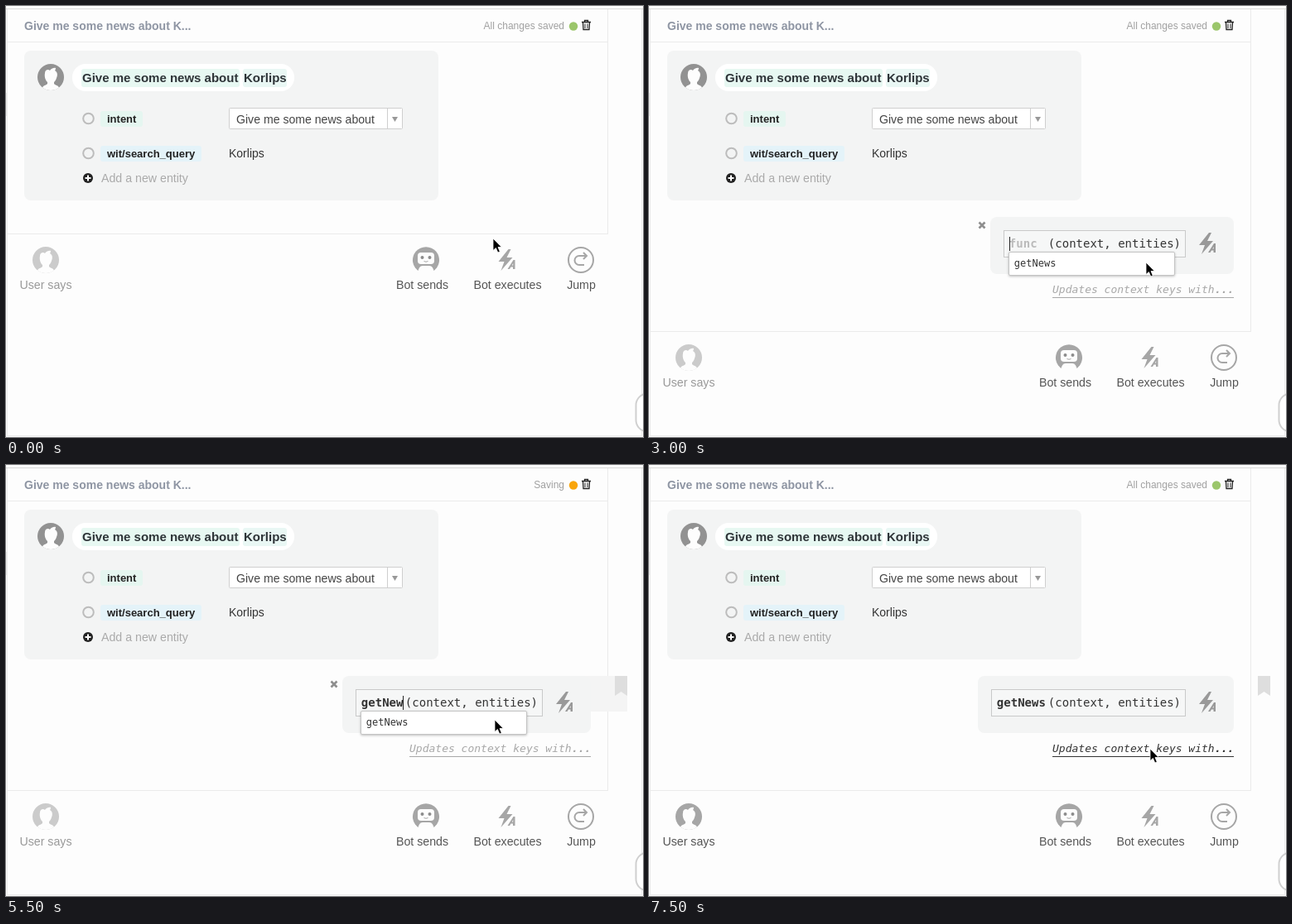
An HTML page that plays this animation: 769x521 px, repeating every 8000 ms.

```html
<!DOCTYPE html>
<html lang="en">
<head>
<meta charset="utf-8">
<title>Story editor</title>
<style>
html, body { margin: 0; width: 100%; height: 100%; overflow: hidden; background: #fdfdfd; }
#stage { position: relative; width: 769px; height: 521px; overflow: hidden; background: #fdfdfd;
  font: 14px "Liberation Sans", Arial, sans-serif; }
svg { display: block; }
.layer { position: absolute; left: 0; top: 0; }
.b { font-weight: bold; }
.rule { fill: #ebebeb; }
.mono { font-family: "DejaVu Sans Mono", monospace; }
.label { font-size: 14.2px; fill: #555; text-anchor: middle; }

/* every change is a hard step on one shared clock */
.t { animation: 8s step-end infinite; }
#foot { animation-name: foot; }
#sideLow { animation-name: open; }
#cursor { animation-name: cursor; }
#hover { animation-name: hover; }
#execIcon { animation-name: execIcon; }
#execLabel { animation-name: execLabel; }
#userIcon { animation-name: userIcon; }
#userLabel { animation-name: userLabel; }
#saved { animation-name: saved; }
#saving { animation-name: saving; }
#dot { animation-name: dot; }
#mark { animation-name: mark; }
#tintRight { animation-name: tintRight; }
#tintLeft { animation-name: tintLeft; }
#panel { animation-name: open; }
#close { animation-name: close; }
#input { animation-name: grow; }
#typed { animation-name: type; }
#hint { animation-name: hint; }
#popup { animation-name: popup; }
#keys { animation-name: open, keys; }

@keyframes foot { 0% { transform: none } 37.5%, 100% { transform: translateY(118px) } }
@keyframes open { 0% { opacity: 0 } 37.5%, 100% { opacity: 1 } }
@keyframes close { 0% { opacity: 1 } 90.625%, 100% { opacity: 0 } }
@keyframes hover { 0% { opacity: 0 } 21.875% { opacity: 1 } 37.5%, 100% { opacity: 0 } }
@keyframes execIcon { 0% { color: #a6a6a6 } 21.875% { color: #8c8c8c } 37.5%, 100% { color: #a6a6a6 } }
@keyframes execLabel { 0% { fill: #555 } 21.875% { fill: #222 } 37.5%, 100% { fill: #555 } }
@keyframes userIcon { 0% { color: #cbcbcb } 90.625%, 100% { color: #a6a6a6 } }
@keyframes userLabel { 0% { fill: #999 } 90.625%, 100% { fill: #555 } }
@keyframes saved { 0% { opacity: 1 } 56.25% { opacity: 0 } 78.125%, 100% { opacity: 1 } }
@keyframes saving { 0% { opacity: 0 } 56.25% { opacity: 1 } 78.125%, 100% { opacity: 0 } }
@keyframes dot { 0% { fill: #9bc66b } 50% { fill: #f9a50b } 84.375%, 100% { fill: #9bc66b } }
@keyframes mark { 0% { opacity: 0 } 50%, 100% { opacity: 1 } }
@keyframes tintRight { 0% { opacity: 0 } 50% { opacity: 1 } 93.75%, 100% { opacity: 0 } }
@keyframes tintLeft { 0% { opacity: 0 } 71.875% { opacity: 1 } 93.75%, 100% { opacity: 0 } }
@keyframes hint { 0% { opacity: 1 } 50%, 100% { opacity: 0 } }
@keyframes popup { 0% { opacity: 1 } 71.875%, 100% { opacity: 0 } }
@keyframes grow { 0% { width: 47px } 68.75% { width: 53px } 71.875%, 100% { width: 62px } }
@keyframes type {
  0% { width: 0; border-color: #222 }
  50% { width: 1ch }
  59.375% { width: 2ch }
  62.5% { width: 3ch }
  65.625% { width: 4ch }
  68.75% { width: 6ch; border-color: #222 }
  71.875%, 100% { width: 7ch; border-color: transparent }
}
@keyframes keys {
  0% { color: #a8a8a8; border-color: #a8a8a8 }
  90.625%, 100% { color: #333; border-color: #333 }
}
@keyframes cursor {
  0% { transform: translate(588px, 281px) }
  3.125% { transform: translate(566px, 297px) }
  6.25% { transform: translate(527px, 313px) }
  9.375% { transform: translate(501px, 309px) }
  12.5% { transform: translate(511px, 305px) }
  18.75% { transform: translate(523px, 297px) }
  21.875% { transform: translate(555px, 299px) }
  25% { transform: translate(583px, 306px) }
  28.125% { transform: translate(598px, 313px) }
  31.25% { transform: translate(600px, 311px) }
  37.5% { transform: translate(600px, 310px) }
  43.75% { transform: translate(595px, 309px) }
  46.875% { transform: translate(590px, 308px) }
  78.125% { transform: translate(612px, 309px) }
  81.25% { transform: translate(629px, 308px) }
  84.375% { transform: translate(624px, 322px) }
  87.5% { transform: translate(612px, 338px) }
  90.625%, 100% { transform: translate(605px, 343px) }
}

#panel { position: absolute; right: 63px; top: 255px; height: 53px; padding: 16px 58px 0 16px;
  border-radius: 8px; background: #f3f4f4; }
#field { display: flex; height: 31px; padding: 0 5px 0 6px; border: 1px solid #c9c9c9;
  background: #f6f7f7; line-height: 31px; color: #333; white-space: pre; }
#input { position: relative; width: 47px; font-weight: bold; }
#input > * { position: absolute; left: 0; top: 0; }
#hint { color: #bbb; }
#input > #typed { top: 7px; height: 17px; line-height: 17px; overflow: hidden;
  border-right: 1px solid #222; color: #333; }
#input > #popup { left: -1px; top: 25px; width: 193px; height: 27px; padding-left: 6px;
  border: 1px solid #c4c4c4; border-radius: 2px; background: #fff; box-shadow: 0 1px 3px rgba(0,0,0,.25);
  font-size: 12px; font-weight: normal; line-height: 26px; color: #333; }
#close { position: absolute; left: -15px; top: 5px; }
#bolt { position: absolute; right: 16px; top: 17px; color: #999; }
#keys { position: absolute; left: 487px; top: 334px; height: 18px; line-height: 17px; font-size: 13px;
  font-style: italic; white-space: pre; border-bottom: 1px solid #a8a8a8; color: #a8a8a8; }
</style>
</head>
<body>
<div id="stage">
<svg class="layer" width="769" height="521">
  <defs>
    <g id="person">
      <circle r="16" fill="currentColor"/>
      <path fill="#fdfdfd" d="M-7-5C-7-9-3-10-1-8C0-10 4-12 6-11C6-9 5-8 5-8C9-6 8-1 7 1C6 4 5 5 4 6V8C6 10 9 10 10 12.5A16 16 0 0 1-10 12.5C-9 10-6 10-4 8V6C-6 4-8 0-7-5Z"/>
    </g>
    <g id="zap" fill="currentColor">
      <path d="M2-13L-10 2H-3L-7 13L7-3H0L5-13Z"/>
      <path d="M1 11L8 0H10V11H7.5V8.5H5L3.5 11ZM6.3 6.5H7.7V4Z"/>
    </g>
  </defs>

  <!-- frame -->
  <rect y="3" width="769" height="1" fill="#d9d9d9"/>
  <rect class="rule" x="1" y="4" width="1" height="516"/>
  <rect class="rule" x="767" y="4" width="1" height="516"/>
  <rect class="rule" x="1" y="519" width="767" height="1"/>
  <rect class="rule" y="105" width="1" height="28"/>
  <rect class="rule" x="2" y="43" width="725" height="1"/>
  <rect class="rule" x="726" y="4" width="1" height="272"/>
  <rect class="rule t" id="sideLow" x="726" y="276" width="1" height="118"/>
  <rect x="760.5" y="468.5" width="40" height="46" rx="14" fill="#fff" stroke="#d0d0d0" stroke-width="2"/>

  <!-- header -->
  <text class="b" x="22" y="29" font-size="14" fill="#8e95a3">Give me some news about K...</text>
  <g font-size="12" fill="#a0a0a0" text-anchor="end">
    <text class="t" id="saved" x="674" y="28">All changes saved</text>
    <text class="t" id="saving" x="674" y="28">Saving</text>
  </g>
  <circle class="t" id="dot" cx="685" cy="24.5" r="5.2"/>
  <g fill="none" stroke="#222" stroke-width="1.3">
    <path d="M695 19.5H706M698.5 19V17.5H702.5V19M696.5 20L697 28.5H704L704.5 20"/>
    <path d="M699 21.5V27M702 21.5V27" stroke-width="1"/>
  </g>

  <!-- user message -->
  <rect x="22" y="54" width="500" height="181" rx="8" fill="#f3f4f4"/>
  <use href="#person" x="54" y="86" color="#929292"/>
  <rect x="80" y="70" width="268" height="33" rx="16" fill="#fff"/>
  <rect x="91" y="76" width="191" height="22" rx="3" fill="#e7f8f2"/>
  <rect x="286" y="76" width="53" height="22" rx="3" fill="#e9f7f4"/>
  <g class="b" font-size="15" fill="#2e3438">
    <text x="92" y="92">Give me some news about</text>
    <text x="287" y="92">Korlips</text>
  </g>
  <g fill="none" stroke="#bcbcbc" stroke-width="2">
    <circle cx="99.5" cy="136" r="6.3"/>
    <circle cx="99.5" cy="178" r="6.3"/>
  </g>
  <rect x="114" y="127" width="51" height="19" rx="3" fill="#e5f6f0"/>
  <rect x="114" y="169" width="122" height="19" rx="3" fill="#e4f3f9"/>
  <g class="b" font-size="13" fill="#222">
    <text x="122" y="141">intent</text>
    <text x="122" y="183">wit/search_query</text>
  </g>
  <rect x="269.5" y="123.5" width="209" height="25" rx="1" fill="#fff" stroke="#cfcfcf"/>
  <path d="M460.5 124V148" stroke="#cfcfcf"/>
  <path d="M466 134H473L469.5 140Z" fill="#999"/>
  <text x="278" y="142" font-size="14.1" fill="#444">Give me some news about</text>
  <text x="269" y="183" font-size="14" fill="#333">Korlips</text>
  <circle cx="99" cy="208" r="6" fill="#222"/>
  <path d="M95.5 208H102.5M99 204.5V211.5" stroke="#fff" stroke-width="2"/>
  <text x="115" y="213" font-size="14.2" fill="#aaa">Add a new entity</text>

  <!-- node backdrop and bookmark -->
  <rect class="t" id="tintLeft" x="382" y="255" width="252" height="76" fill="#f6f6f6"/>
  <rect class="t" id="tintRight" x="690" y="255" width="60" height="43" fill="#f4f4f4"/>
  <path class="t" id="mark" d="M735 255H750V279L742.5 274L735 279Z" fill="#dedede"/>

  <!-- action bar -->
  <g class="t" id="foot">
    <rect class="rule" x="2" y="275" width="725" height="1"/>
    <rect class="t" id="hover" x="554" y="281" width="103" height="76" fill="#f9f9f9"/>
    <g class="t" id="userIcon"><use href="#person" x="48" y="307"/></g>
    <text class="label t" id="userLabel" x="48" y="342">User says</text>
    <g transform="translate(507 307)">
      <path d="M-8 14A16 16 0 1 1 8 14Z" fill="#a6a6a6"/>
      <path d="M-6-9H6Q10-9 10-5V1Q10 5 6 5H-6Q-10 5-10 1V-5Q-10-9-6-9Z" fill="#fdfdfd"/>
      <path d="M-10 16Q-9 7-4 7H4Q9 7 10 16Z" fill="#fdfdfd"/>
      <circle cx="-4.500" cy="-3" r="2" fill="#8c8c8c"/>
      <circle cx="4.500" cy="-3" r="2" fill="#8c8c8c"/>
      <path d="M-2.500 1.500Q0 3 2.500 1.500" fill="none" stroke="#a6a6a6"/>
    </g>
    <text class="label" x="502.5" y="342">Bot sends</text>
    <g class="t" id="execIcon"><use href="#zap" x="604.5" y="307"/></g>
    <text class="label t" id="execLabel" x="605.5" y="342">Bot executes</text>
    <g fill="none" stroke="#a6a6a6" stroke-width="2">
      <circle cx="694" cy="307" r="15"/>
      <path d="M698 313H692A5.500 5.500 0 0 1 692 302H700M697 298L701 302L697 306"/>
    </g>
    <text class="label" x="694.5" y="342">Jump</text>
  </g>
</svg>

<div class="t" id="panel">
  <svg class="t" id="close" width="10" height="10"><path d="M1.5 1.5L8.5 8.5M8.5 1.5L1.5 8.5" stroke="#8e8e8e" stroke-width="2.6"/></svg>
  <div class="mono" id="field">
    <div class="t" id="input">
      <span class="t" id="hint">func</span>
      <span class="t" id="typed">getNews</span>
      <div class="t" id="popup">getNews</div>
    </div>
    <span>(context, entities)</span>
  </div>
  <svg id="bolt" width="32" height="30"><use href="#zap" x="16" y="15"/></svg>
</div>
<div class="mono t" id="keys">Updates context keys with<b>...</b></div>

<svg class="layer" width="769" height="521">
  <path class="t" id="cursor" d="M0 0V14.5L3.4 11.500L5.800 17L8.300 16L6 10.500H10.300Z" fill="#000" stroke="#fff" stroke-width=".8" stroke-linejoin="round"/>
</svg>
</div>
</body>
</html>
```
